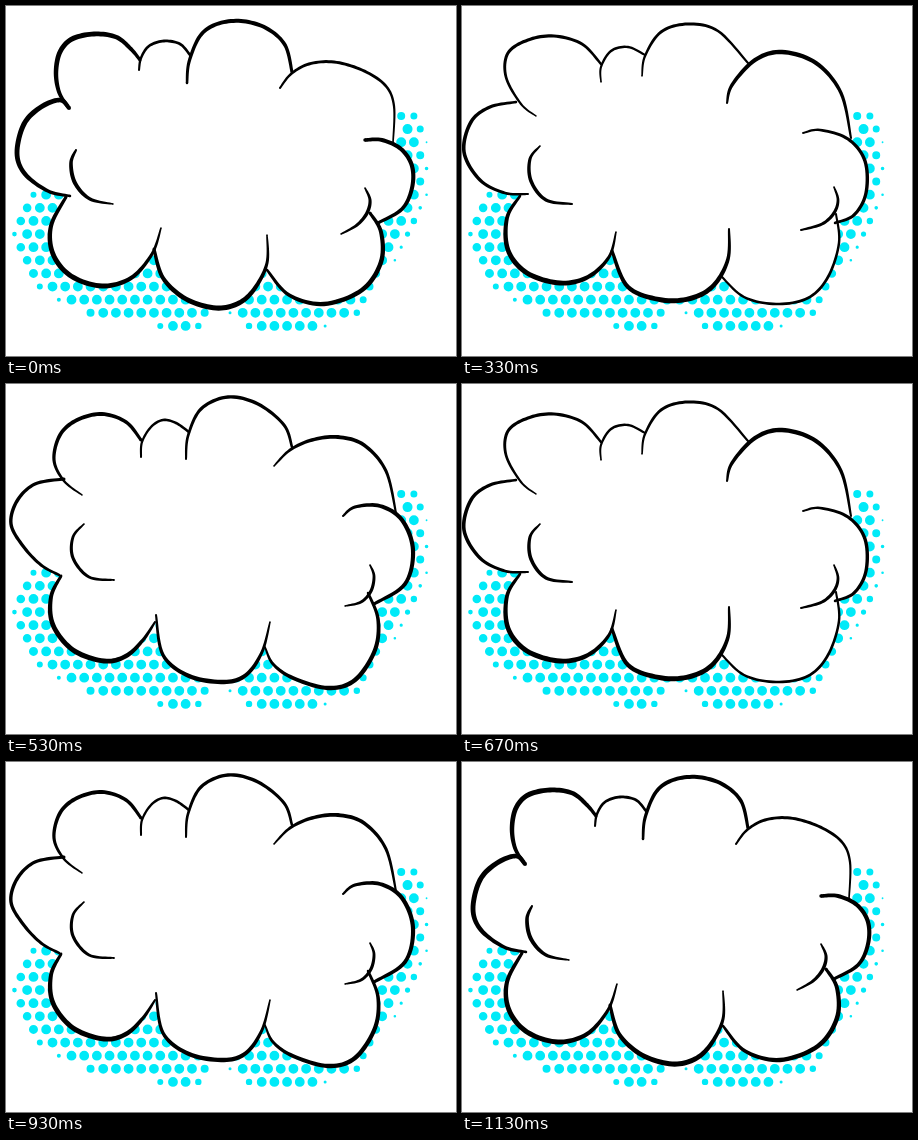
An HTML page with a canvas that plays this animation: 450x350 px, repeating every 1.21 s.

```html
<!DOCTYPE html>
<html lang="en">
<head>
<meta charset="utf-8">
<title>Wobbling cloud</title>
<style>
html, body { margin: 0; width: 450px; height: 350px; overflow: hidden; background: #fff; }
canvas { display: block; }
</style>
</head>
<body>
<canvas id="stage" width="450" height="350"></canvas>
<script>
const ctx = document.getElementById('stage').getContext('2d');

// Halftone rows: [row, first x, last x, first radius, last radius]
const GAP_X = 12.68, GAP_Y = 13.12, TOP = 110;
const dotRows = [
  [0, 390, 410, 4, 3.5], [1, 390, 417, 5, 3.5], [2, 390, 422, 5, 0.9],
  [3, 390, 417, 5, 4], [4, 390, 423, 5, 1.8], [5, 390, 417, 5, 4],
  [6, 25, 423, 3, 1.3], [7, 18, 416, 4.3, 1.8], [8, 12, 410, 4.3, 3.2],
  [9, 6, 404, 2.3, 2.6], [10, 12, 397, 4.3, 1.6], [11, 18, 391, 4.3, 1.3],
  [12, 25, 373, 4.5, 4.3], [13, 31, 366, 3, 4], [14, 50, 360, 2, 3.5],
  [15, 82, 201, 4, 4], [15, 222, 353, 1.5, 3.2],
  [16, 152, 201, 3, 3.2], [16, 240, 330, 3.2, 1.5]
];

function drawDots() {
  ctx.fillStyle = '#00eaf8';
  ctx.beginPath();
  for (const [row, from, to, r0, r1] of dotRows) {
    const offset = row % 2 ? 8.46 : 14.8;
    const y = TOP + row * GAP_Y;
    const first = Math.ceil((from - offset) / GAP_X);
    const last = Math.floor((to - offset) / GAP_X);
    for (let k = first; k <= last; k++) {
      const x = offset + k * GAP_X;
      const r = k === last ? r1 : k === first ? r0 : 4.9;
      ctx.moveTo(x + r, y);
      ctx.arc(x, y, r, 0, 7);
    }
  }
  ctx.fill();
}

// Smooth curve through x,y pairs
function curve(...xy) {
  const n = xy.length / 2, pts = [], STEPS = 10;
  const at = (i, axis) => xy[2 * Math.max(0, Math.min(n - 1, i)) + axis];
  const blend = (i, u, axis) => {
    const a = at(i - 1, axis), b = at(i, axis), c = at(i + 1, axis), d = at(i + 2, axis);
    return b + u * ((c - a) + u * ((2 * a - 5 * b + 4 * c - d) + u * (3 * b - a - 3 * c + d))) / 2;
  };
  for (let i = 0; i < n - 1; i++)
    for (let s = 0; s < STEPS; s++) pts.push([blend(i, s / STEPS, 0), blend(i, s / STEPS, 1)]);
  pts.push([at(n - 1, 0), at(n - 1, 1)]);
  return pts;
}

// Brush line whose width runs from start through middle to end
const brush = (w0, wm, w1, ...xy) => ({ pts: curve(...xy), w0, wm, w1 });

function drawBrush({ pts, w0, wm, w1 }) {
  const last = pts.length - 1, left = [], right = [];
  pts.forEach(([x, y], i) => {
    const p = pts[Math.max(0, i - 1)], q = pts[Math.min(last, i + 1)];
    const dx = q[0] - p[0], dy = q[1] - p[1], len = Math.hypot(dx, dy) || 1;
    const t = i / last;
    const w = w0 * (1 - t) * (1 - 2 * t) + 4 * wm * t * (1 - t) + w1 * t * (2 * t - 1);
    const nx = -dy / len * w / 2, ny = dx / len * w / 2;
    left.push([x + nx, y + ny]);
    right.unshift([x - nx, y - ny]);
  });
  ctx.beginPath();
  for (const [x, y] of left.concat(right)) ctx.lineTo(x, y);
  ctx.fill();
  for (const [i, w] of [[0, w0], [last, w1]]) {
    ctx.beginPath();
    ctx.arc(...pts[i], w / 2, 0, 7);
    ctx.fill();
  }
}

// Outlines run clockwise from the upper left bump
const bold = {
  outline: [
    brush(3, 5, 3, 62,101, 53,86, 50,66, 54,46, 66,33, 88,28, 110,31, 125,43, 134,54),
    brush(2, 2.8, 2.5, 133,64, 135,52, 143,40, 158,35, 174,38, 184,49),
    brush(2.5, 4, 3, 181,77, 183,56, 194,30, 211,18, 235,15, 260,22, 279,39, 286,66),
    brush(2, 3, 1.6, 274,82, 285,68, 303,58, 328,56, 356,64, 379,79, 388,100, 387,137),
    brush(3.5, 4.2, 3, 359,134, 376,134, 395,143, 406,160, 406,182, 396,203, 372,217),
    brush(3, 4.6, 2.5, 364,207, 375,226, 375,256, 356,284, 318,298, 283,289, 261,264),
    brush(1.5, 5, 3, 261,229, 261,257, 249,282, 233,297, 210,302, 180,293, 157,272, 148,243),
    brush(1.5, 5, 3, 155,222, 146,248, 125,272, 96,280, 65,270, 47,248, 45,220, 60,191),
    brush(2.5, 5, 4, 64,190, 42,185, 19,168, 11,147, 18,118, 35,101, 54,94, 63,102)
  ],
  details: [
    brush(1.6, 3.5, 1.5, 359,182, 364,194, 361,207, 351,219, 335,228),
    brush(2, 4, 1.5, 70,144, 65,157, 69,177, 84,193, 107,198)
  ]
};

const light = {
  outline: [
    brush(1.5, 3.8, 3, 76,111, 58,97, 48,76, 54,51, 71,36, 96,30, 120,38, 135,56),
    brush(2, 2.5, 2.5, 135,73, 136,58, 145,43, 157,36, 170,39, 183,48),
    brush(2, 3.4, 2.5, 180,75, 182,52, 195,25, 222,13, 252,20, 278,41, 286,63),
    brush(1.6, 3.8, 2, 268,82, 284,66, 306,56, 332,53, 358,61, 380,87, 390,129),
    brush(2, 4.2, 3, 337,132, 349,123, 374,122, 396,136, 407,166, 399,200, 368,220),
    brush(2.5, 4.4, 1.6, 362,209, 372,235, 369,266, 349,296, 322,304, 287,294, 267,280, 259,263),
    brush(1.5, 4.4, 2, 264,238, 256,268, 240,291, 218,298, 183,292, 157,271, 150,231),
    brush(2, 5, 2.8, 149,238, 137,256, 120,272, 98,277, 67,266, 47,241, 45,213, 55,192),
    brush(2.5, 3.4, 3, 53,191, 35,181, 17,162, 5,140, 11,117, 29,100, 58,95)
  ],
  details: [
    brush(1.6, 3.2, 1.5, 364,181, 368,192, 365,207, 355,218, 339,222),
    brush(1.6, 3.2, 1.8, 78,140, 67,153, 67,174, 83,193, 108,196)
  ]
};

const wide = {
  outline: [
    brush(1.4, 3.2, 2.4, 74,110, 59,98, 44,71, 46,47, 66,34, 92,30, 120,38, 139,58),
    brush(1.5, 2.5, 2, 139,76, 139,61, 149,45, 166,41, 183,49),
    brush(1.5, 3, 2, 180,70, 183,50, 199,26, 226,18, 256,25, 286,57),
    brush(2, 4.4, 2, 265,97, 270,79, 293,54, 320,46, 354,57, 379,87, 389,132),
    brush(1.8, 3.4, 2.5, 341,127, 358,124, 386,133, 403,155, 404,187, 392,209, 373,217),
    brush(2, 2.8, 2, 374,208, 377,237, 366,271, 346,292, 314,298, 282,291, 259,270),
    brush(2, 5, 3, 267,223, 266,253, 252,279, 230,292, 200,294, 166,281, 150,245),
    brush(1.5, 5, 2.5, 154,226, 147,251, 126,271, 98,277, 65,267, 46,244, 45,212, 58,190),
    brush(2, 3.6, 2.5, 66,188, 43,187, 18,174, 2,146, 9,116, 28,101, 54,96)
  ],
  details: [
    brush(1.6, 3.2, 2, 372,181, 376,194, 372,207, 360,218, 339,224),
    brush(1.6, 3.6, 2, 78,140, 68,153, 69,175, 84,194, 110,198)
  ]
};

function drawCloud({ outline, details }) {
  ctx.fillStyle = '#fff';
  ctx.beginPath();
  for (const { pts } of outline)
    for (const [x, y] of pts) ctx.lineTo(x, y);
  ctx.fill();
  ctx.beginPath();
  ctx.ellipse(205, 160, 160, 78, 0, 0, 7);
  ctx.fill();
  ctx.fillStyle = '#000';
  outline.concat(details).forEach(drawBrush);
}

const LOOP = 1210;
const poses = [bold, light, wide];
const changes = [170, 330, 400, 530, 670, 770, 930, 1030, 1130];
const start = performance.now();
let shown = null;

function render() {
  const time = (performance.now() - start) % LOOP;
  const pose = poses[changes.filter(c => c <= time).length % poses.length];
  if (pose !== shown) {
    shown = pose;
    ctx.fillStyle = '#fff';
    ctx.fillRect(0, 0, 450, 350);
    drawDots();
    drawCloud(pose);
  }
  requestAnimationFrame(render);
}
render();
</script>
</body>
</html>
```
